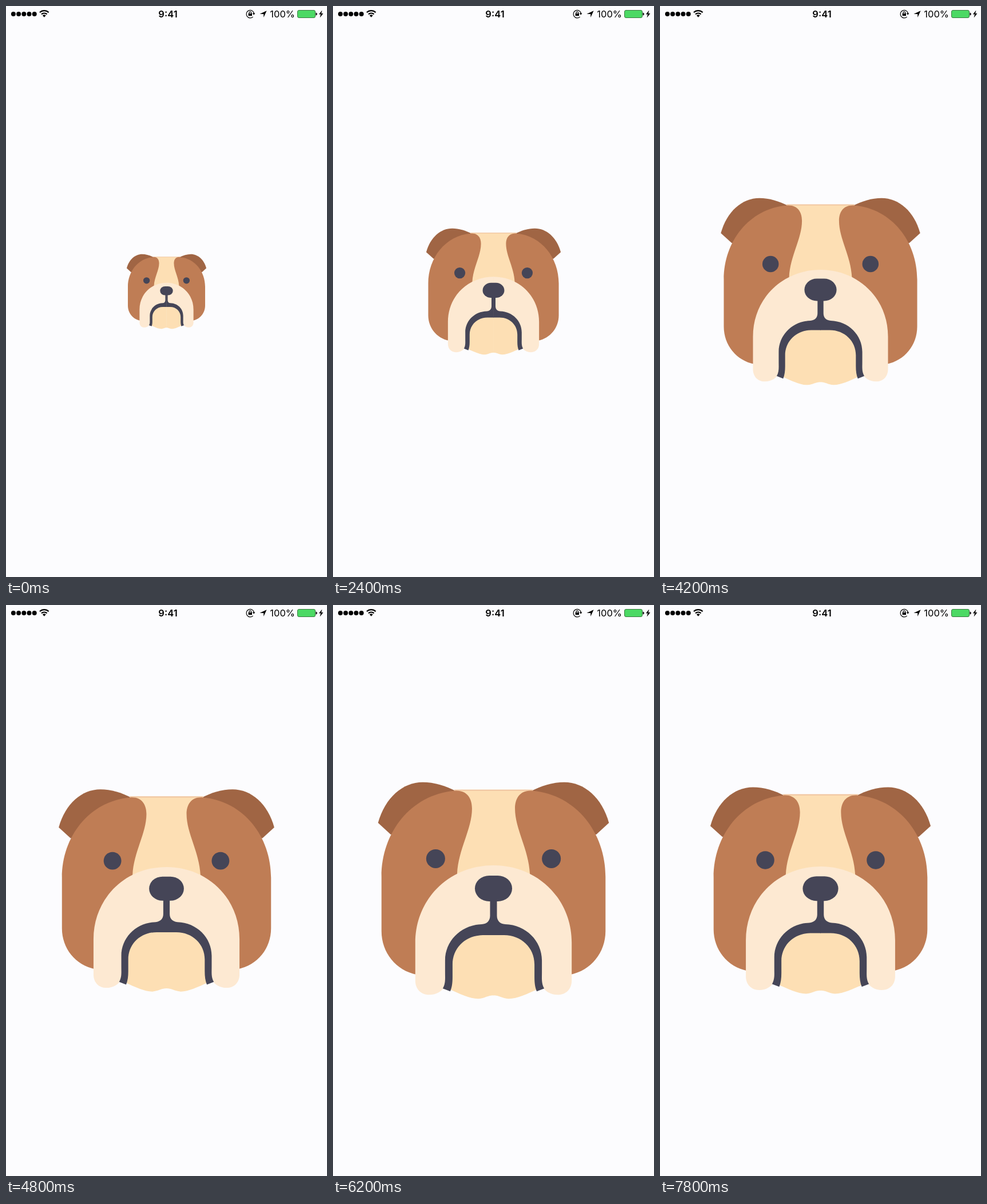
Recreate the animation shown at these times as an HTML page. Size 561 by 998 pixels, loop 8 s.

```html
<!DOCTYPE html>
<html lang="en">
<head>
<meta charset="utf-8">
<title>Bulldog launch screen</title>
<style>
  html, body { margin: 0; width: 100%; height: 100%; overflow: hidden; background: #fcfcfe; }
  svg { display: block; width: 100%; height: 100%; }
  text { font: 16.5px Inter, "Liberation Sans", sans-serif; }
</style>
</head>
<body>
<svg viewBox="0 0 561 998">
  <defs>
    <!-- Left half of each mirrored part -->
    <path id="ear" fill="#a06544" d="M79 381C91 337 122 310 157 310C177 310 196 316 216 326L180 400L101 401Z"/>
    <path id="patch" fill="#bf7d55" d="M85 475C85 398 136 332 212 325C234 323 243 338 243 356C243 392 219 427 217 470L215 620L147 646C110 639 85 607 85 570Z"/>
    <path id="muzzle" fill="#fde9d2" d="M281 455C203 455 144 514 144 590V656C144 671 154 681 168 681C181 681 191 675 197 664L281 580Z"/>
    <path id="chin" fill="#fddfb4" d="M281 565H255L203 600V671C221 679 239 688 254 688C266 687 270 682 281 682Z"/>
    <path id="mouth" fill="#454557" d="M281 510H274.5V543C274.5 552 269 557.5 260 558C224 559 196 587 196 621V642C196 653 197 661 192 670L205 675C208 668 209 660 209 650V628C209 599 232 577 262 577H281Z"/>
    <circle id="eye" fill="#454557" cx="179.5" cy="443.5" r="16.5"/>
  </defs>

  <g id="dog">
    <g id="back"></g>
    <path fill="#fddfb4" d="M212 323H349L355 500H206Z"/>
    <path stroke="#f0c5a2" stroke-width="2" d="M212 324H349"/>
    <g id="front"></g>
    <rect x="248" y="473" width="65" height="45" rx="25" ry="22.5" fill="#454557"/>
  </g>

  <g id="dots"></g>
  <g fill="none" stroke="#000" stroke-width="2.2">
    <path d="M59 11.3A11.2 11.2 0 0 1 74.6 11.3"/>
    <path d="M62 14.4A7 7 0 0 1 71.6 14.4"/>
  </g>
  <path d="M63.9 16.6A4.2 4.2 0 0 1 69.7 16.6L66.8 19.7Z"/>
  <text x="283" y="20" text-anchor="middle" font-weight="600" style="font-weight:600">9:41</text>

  <g fill="none" stroke="#000" stroke-width="1.2">
    <path d="M431.6 18.8A6.7 6.7 0 1 1 433.4 13"/>
    <path d="M424.9 13.5V12A1.9 1.9 0 0 1 428.7 12V13.5"/>
  </g>
  <path d="M423.6 13H430V17.3H423.6ZM430.8 12.6H435.4L433.1 15.8Z"/>
  <path d="M455.6 8.3L450.2 20V14H443.4Z"/>
  <text x="505" y="20" text-anchor="end">100%</text>
  <rect x="509.5" y="7.5" width="31" height="13" rx="2.5" fill="#4cd964" stroke="#39793f"/>
  <path d="M541.5 11.5A2.3 2.5 0 0 1 541.5 16.5Z"/>
  <path d="M552.4 7.5L546.8 14.6H550L548.6 20.5L554.4 13H551.1Z"/>
</svg>
<script>
  const LOOP = 8000, STEP = 200;
  const EASE = 6300, GROW_FROM = -200, SHRINK_FROM = 6730;
  const MIN = 138.5, MAX = 403.5, DRAWN = 403;
  const CX = 280.5, CY = 499;
  const $ = id => document.getElementById(id);

  const mirrored = ids => ids.map(id =>
    `<use href="#${id}"/><use href="#${id}" transform="matrix(-1 0 0 1 561 0)"/>`).join('');
  $('back').innerHTML = mirrored(['ear']);
  $('front').innerHTML = mirrored(['patch', 'muzzle', 'chin', 'mouth', 'eye']);
  $('dots').innerHTML = Array.from({ length: 5 }, (_, i) =>
    `<circle cx="${12.9 + i * 9.2}" cy="14" r="4"/>`).join('');

  function ease(time, start) {
    const p = Math.min(1, Math.max(0, (time - start) / EASE));
    return (1 - Math.cos(Math.PI * p)) / 2;
  }

  // Grow, rest at full size, then start shrinking
  function render(now) {
    const t = Math.floor((now % LOOP) / STEP) * STEP;
    const width = MIN + (MAX - MIN) * (ease(t, GROW_FROM) - ease(t, SHRINK_FROM));
    $('dog').setAttribute('transform',
      `translate(${CX} ${CY}) scale(${width / DRAWN}) translate(${-CX} ${-CY})`);
  }

  function tick() {
    render(performance.now());
    requestAnimationFrame(tick);
  }
  tick();
</script>
</body>
</html>
```
